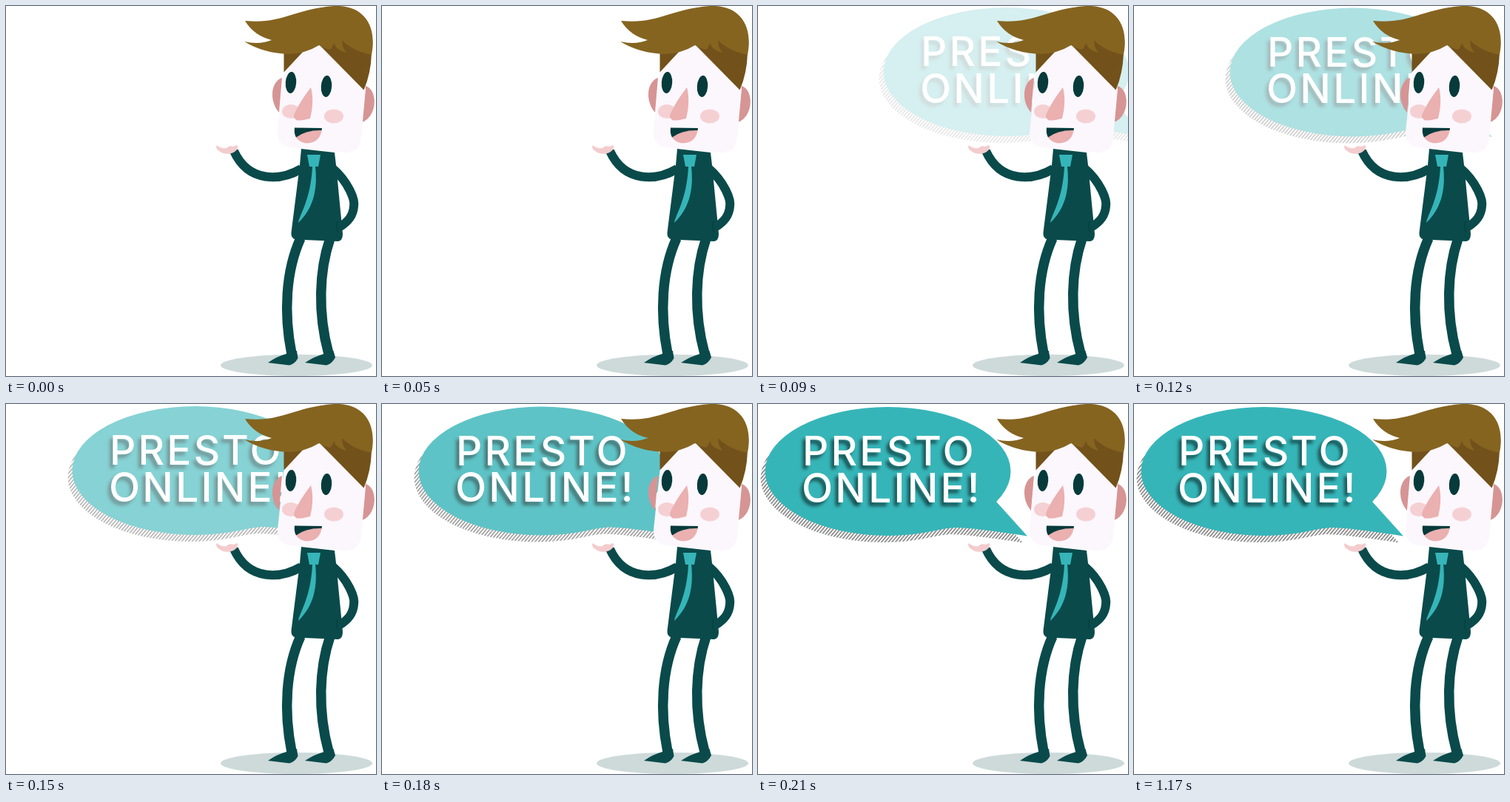
These frames come from a looping animation (500x500 px, 1.81 s). An HTML page:

```html
<!DOCTYPE html>
<html lang="it">
<head>
<meta charset="utf-8">
<title>Presto online</title>
<style>
  html, body { margin: 0; width: 100%; height: 100%; overflow: hidden; background: #fff; }
  svg { display: block; width: 100%; height: 100%; }
  .slogan {
    font: 500 55px Inter, "Open Sans", sans-serif;
    letter-spacing: 3.2px;
    fill: #fff;
    filter: drop-shadow(-4px 5px 2px rgba(0, 0, 0, .55));
  }
  .suit { fill: #0a4a4b; }
  .limb { fill: none; stroke: #0a4a4b; stroke-width: 13.5; }
  .arm { stroke-width: 12; }
  .ink { fill: #063a3b; }
  .teal { fill: #36b5b8; }
  .skin { fill: #fbf7fc; }
  .ear { fill: #d69594; }
  .blush { fill: #f5d0d3; }
  .rose { fill: #ebb0b0; }
  .hair { fill: #856420; }
  .hair-dark { fill: #73511a; }
</style>
</head>
<body>
<svg viewBox="0 0 500 500">
  <defs>
    <pattern id="hatch" width="3.6" height="3.6" patternUnits="userSpaceOnUse" patternTransform="rotate(40)">
      <path d="M1.8 0V3.6" stroke="#777" stroke-width="1.5"/>
    </pattern>
    <path id="balloon" d="M9.500 91a166 87 0 0 1 332 0a166 87 0 0 1 -332 0ZM322 132L364 178.500Q290 167 266 167Q252 168 240 171L260 132Z"/>
  </defs>

  <g id="bubble" opacity="0">
    <use href="#balloon" x="-6" y="9" fill="url(#hatch)"/>
    <use href="#balloon" class="teal"/>
    <g class="slogan">
      <text x="60" y="83">PRESTO</text>
      <text x="59" y="132.500">ONLINE!</text>
    </g>
  </g>

  <ellipse cx="392.500" cy="485.500" rx="102.500" ry="14.500" fill="#cddad9"/>

  <!-- legs and shoes -->
  <path class="limb" d="M398 314C378 358 375 415 386 470M438 314C423 358 421 415 436 470"/>
  <path class="suit" d="M379 467L393 466L394.500 476Q390 484 383 485.500L354 482Q367 473 379 470Z"/>
  <path class="suit" d="M429 467L442.500 466L445 475Q440 484 433 485.500L404 482Q418 473 430 470Z"/>

  <!-- arms, torso, tie -->
  <path class="limb arm" d="M399 220C372 236 328 240 308 196"/>
  <path class="limb arm" d="M441 219C463 238 472 262 470 271C469 284 462 292 450 299"/>
  <path class="suit" d="M399 193L444 198L446 215L455 308Q455 317 449 318L391 315.500Q385 314 385.500 306L397 215Z"/>
  <path d="M448 291Q445 299 449 306" fill="none" stroke="#063a3b"/>
  <path class="teal" d="M407 201H425L422 217H410ZM414 217H418C421 245 417 272 395 293C396 283 412 262 414 217Z"/>
  <path fill="#f3cccd" d="M285 188Q282 192 288 196Q295 201 303 199.500Q312 198 313.500 189Q311 187 308 190Q301 188 298 192Q290 193 285 188Z"/>

  <!-- head -->
  <path class="ear" d="M373 97C358 102 355 128 369 144ZM486 108C503 113 502 150 481 157Z"/>
  <path class="skin" d="M376 85L367 170Q366 188 384 191L455 198Q478 200 480 178L486 112L424 50L400 60Z"/>
  <path class="hair-dark" d="M375.500 62L403 60L375.500 89.500ZM422 51L483.500 113.500Q493 92 494 64L455 44Z"/>
  <path class="hair" d="M323 20C372 25 389 4 443 0C483 -2 502 26 494 66C474 62 462 54 454 46Q454 56 460 63Q446 60 443 50Q441 56 438 59Q430 57 423 53Q405 64 383 65Q348 64 322 48Q342 53 359 46Q335 40 323 20Z"/>

  <!-- face -->
  <ellipse class="blush" cx="385" cy="142.500" rx="12" ry="9.500"/>
  <ellipse class="blush" cx="443" cy="149" rx="13" ry="9.500"/>
  <ellipse class="ink" cx="385" cy="103.500" rx="7.200" ry="14.500" transform="rotate(4 385 103.500)"/>
  <ellipse class="ink" cx="433" cy="108.500" rx="7.200" ry="14.500" transform="rotate(4 433 108.500)"/>
  <path class="rose" d="M412 110C416 125 414 140 411 152Q400 155 393 154.500Q386 151 391 143Q398 128 412 110Z"/>
  <path class="ink" d="M390 164.500L427 165L426.500 168.500L392 177.500Q389 172 390 164.500Z"/>
  <path class="rose" d="M392 177.500Q405 167.500 426.500 168Q424 185 406 185.500Q396 184 392 177.500Z"/>
</svg>
<script>
  const LOOP = 1810, START = 60, TICK = 30, STEPS = 5;
  const bubble = document.getElementById("bubble");

  // The bubble slides in from the right in hard steps while it fades in.
  function draw(time) {
    const step = Math.min(STEPS, Math.max(0, Math.floor((time - START) / TICK)));
    const left = STEPS - step;
    bubble.setAttribute("transform", `translate(${40 * left} ${-0.5 * left})`);
    bubble.setAttribute("opacity", step / STEPS);
  }

  const origin = performance.now();
  function tick() {
    draw((performance.now() - origin) % LOOP);
    requestAnimationFrame(tick);
  }
  tick();
</script>
</body>
</html>
```
